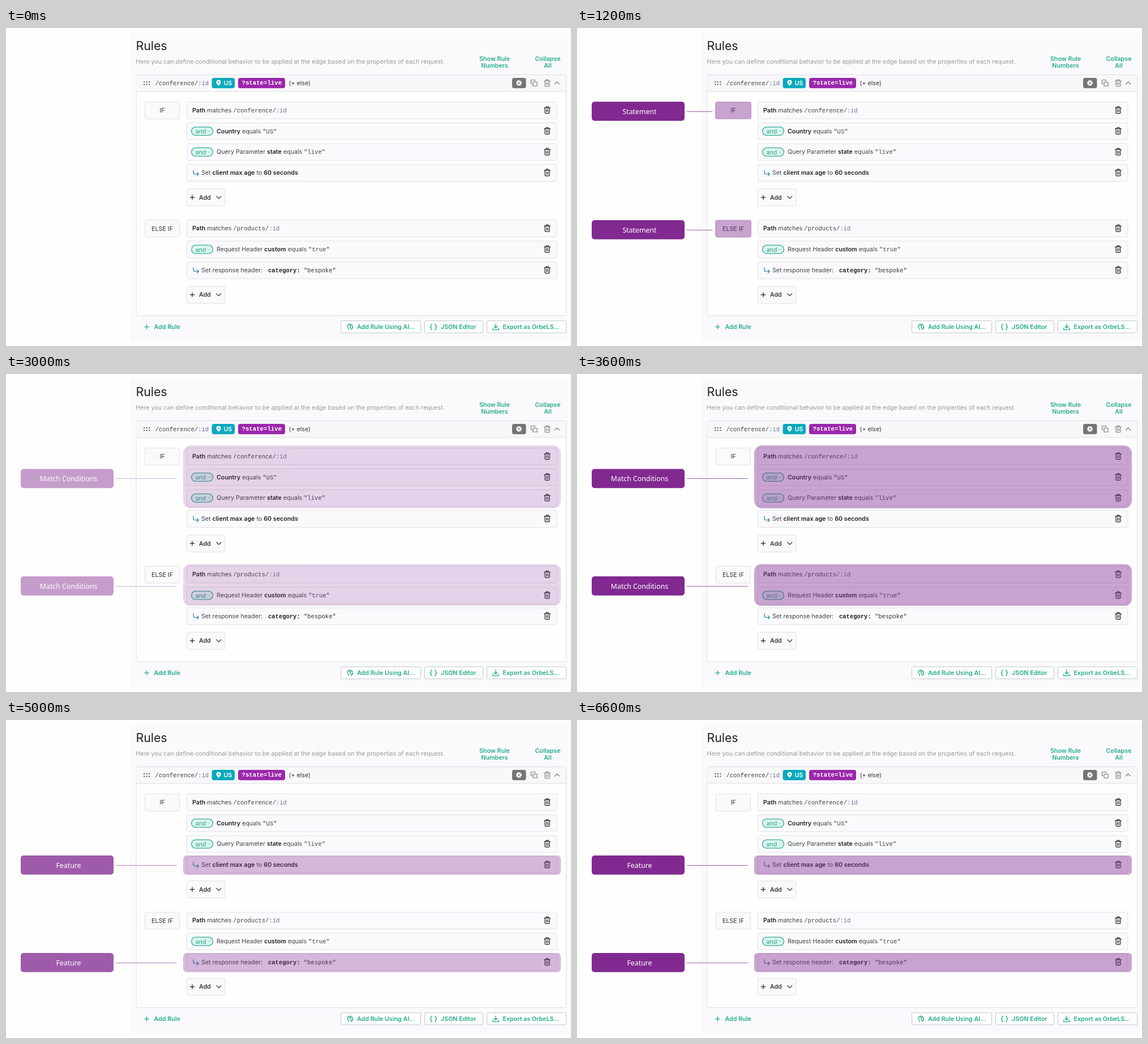
An HTML page for the animation above (6800 ms loop, 998 by 561 pixels).

```html
<!DOCTYPE html>
<html lang="en">
<head>
<meta charset="utf-8">
<title>Rules</title>
<style>
  html, body { margin: 0; width: 100%; height: 100%; overflow: hidden; background: #fefefd; }
  svg { display: block; width: 100%; height: 100%; }
  text { font: 10.7px Inter, sans-serif; fill: #444; white-space: pre; }
  .bold { font-weight: 600; fill: #222; }
  .mono { font-family: "Liberation Mono", monospace; font-size: 10.5px; }
  .id { fill: #63709c; }
  .link { font-weight: 600; fill: #25ab8e; }
  .label { font: 12.3px "Noto Sans", sans-serif; fill: #fff; }
  .mid { text-anchor: middle; }
  path { fill: none; stroke: #222; stroke-width: 1.2; stroke-linecap: round; stroke-linejoin: round; }
  .green { stroke: #25ab8e; stroke-width: 1.3; }
  .grey { stroke: #777; stroke-width: 1.1; }
</style>
</head>
<body>
<svg id="stage" viewBox="0 0 998 561"></svg>
<script>
const PURPLE = '#812990', BORDER = '#e0e1e6';

const box = (x, y, w, h, fill, r = 3, extra = '') =>
  `<rect x="${x}" y="${y}" width="${w}" height="${h}" rx="${r}" fill="${fill}" ${extra}/>`;
const framed = (x, y, w, h, fill = '#fafafd', r = 2.5, stroke = BORDER) =>
  box(x + .5, y + .5, w - 1, h - 1, fill, r, `stroke="${stroke}"`);
const text = (x, y, str, cls = '', style = '') =>
  `<text x="${x}" y="${y}" class="${cls}" style="${style}">${str}</text>`;
const path = (x, y, d, cls = '') => `<path transform="translate(${x} ${y})" d="${d}" class="${cls}"/>`;

// *bold*, `monospace`, and a tinted :id parameter
const rich = str => str
  .replace(/\*(.+?)\*/g, '<tspan class="bold">$1</tspan>')
  .replace(/`(.+?)`/g, '<tspan class="mono">$1</tspan>')
  .replace(':id', '<tspan class="id">:id</tspan>');

const plus = (x, y, cls) => path(x, y, 'M-3.8 0H3.8M0-3.8V3.8', cls);
const chevron = (x, y, dir = 1, cls = '') => path(x, y, `M-4 ${-2 * dir}L0 ${2 * dir}L4 ${-2 * dir}`, cls);
const trash = (x, y, cls) => path(x, y,
  'M-5.3-3.8H5.3M-2-3.8V-5.8H2V-3.8M-4-3.8V4.6Q-4 6-2.6 6H2.6Q4 6 4 4.6V-3.8M-1.3-1V3.3M1.3-1V3.3', cls);

function row(y, kind, str) {
  let out = framed(319, y, 654.5, 30.7) + trash(956, y + 14.6);
  let x = 329;
  if (kind === 'and') {
    x = 372;
    out += box(327.6, y + 7.9, 37.8, 14.8, '#dcf5ef', 7.4, 'stroke="#36ad95" stroke-width="1.3"')
      + text(334.5, y + 19.3, 'and', '', 'fill:#2ba58c')
      + `<path d="M356.5 ${y + 14.6}l2 2 2-2" style="stroke:#8fcfc0;stroke-width:1"/>`;
  } else if (kind === 'set') {
    x = 345;
    out += `<path d="M331 ${y + 10.5}v4q0 3 3 3h6.2m-2.8-2.8l2.8 2.8-2.8 2.8" style="stroke:#2a7f9d"/>`;
  }
  return out + text(x, y + 18.8, rich(str));
}

function statement(y, name, rows) {
  const addY = y + rows.length * 36.75 + 6.4;
  return framed(245, y, 62, 31) + text(276, y + 19.4, name, 'mid', 'fill:#333')
    + rows.map(([kind, str], i) => row(y + i * 36.75, kind, str)).join('')
    + framed(319, addY, 68.5, 31) + plus(329, addY + 15.4)
    + text(341, addY + 19.2, 'Add', '', 'font-weight:500;fill:#222') + chevron(375.8, addY + 15.4);
}

function ruleHeader() {
  let dots = '';
  for (let i = 0; i < 6; i++)
    dots += `<circle cx="${244.2 + i % 3 * 4.5}" cy="${i < 3 ? 95 : 99.4}" r="1.2" fill="#666"/>`;
  return box(230, 83, 759, 29, '#f8f8fa') + box(230, 111.5, 759, 1, BORDER, 0) + dots
    + text(263.5, 100.8, rich('`/conference/:id`'))
    + box(363.5, 88, 40.5, 18.3, '#0ba9bc', 4)
    + '<path d="M375.5 102Q371.5 98 371.5 95.7A4 4 0 0 1 379.5 95.7Q379.5 98 375.5 102Z" style="fill:#fff;stroke:none"/>'
    + '<circle cx="375.5" cy="95.8" r="1.4" fill="#0ba9bc"/>'
    + text(384.5, 100.8, 'US', 'bold', 'fill:#fff')
    + box(410, 88, 83, 18.3, '#9a27ab', 4)
    + text(416.5, 100.3, '?state=live', 'mono bold', 'fill:#fff;font-size:10.7px')
    + text(499.5, 100.8, '(+ else)', '', 'fill:#333')
    + box(894, 88, 24.5, 18.3, '#757575', 3.5)
    + '<circle cx="906" cy="97" r="2.7" fill="none" stroke="#fff" stroke-width="2.2"/>'
    + '<circle cx="906" cy="97" r="4.2" fill="none" stroke="#fff" stroke-width="1.7" stroke-dasharray="2 1.3"/>'
    + path(932.5, 97, 'M-1.5-1.5H5.5V5.2H-1.5ZM-3.2 1.5H-5V-5.2H2V-3.3', 'grey')
    + trash(956, 97, 'grey') + chevron(973.5, 97, -1, 'grey');
}

function footer() {
  const button = (x, w, tx, label) => framed(x, 516, w, 22.3, '#fefefd', 2, '#c3c9cf') + text(tx, 531, label, 'link');
  return plus(248.5, 527.3, 'green') + text(261.5, 531, 'Add Rule', 'link')
    + button(591, 142, 620, 'Add Rule Using AI...')
    + button(739, 104, 768, 'JSON Editor')
    + button(849, 141, 877.5, 'Export as OrbeLS...')
    + path(607.5, 527, 'M-2.5 5V2.5Q-5 .5-4.6-1.5A4.8 4.8 0 0 1 4.6-.8L5.3 1.5H4.2V3.5H1.8V5M-1.5-1.5A1.7 1.7 0 1 1 .3.5V2', 'green')
    + path(755, 527.3, 'M-2.5-5Q-4.3-5-4.3-3V-1.3Q-4.3 0-5.8 0Q-4.3 0-4.3 1.3V3Q-4.3 5-2.5 5M2.5-5Q4.3-5 4.3-3V-1.3Q4.3 0 5.8 0Q4.3 0 4.3 1.3V3Q4.3 5 2.5 5', 'green')
    + path(865, 527.3, 'M0-5.5V2M-3-1L0 2L3-1M-5.3 2V5H5.3V2', 'green');
}

const page = box(219, 9, 779, 543.5, '#fafafd', 0)
  + text(229.5, 38.6, 'Rules', '', 'font-size:21.3px;fill:#222')
  + text(229.3, 62.5, 'Here you can define conditional behavior to be applied at the edge based on the properties of each request.', '', 'fill:#999')
  + text(863, 58, 'Show Rule', 'link mid') + text(863, 70, 'Numbers', 'link mid')
  + text(957, 58, 'Collapse', 'link mid') + text(957, 70, 'All', 'link mid')
  + framed(229.5, 82, 760.5, 426, '#fefefd', 3)
  + ruleHeader()
  + statement(130, 'IF', [
      ['', '*Path* matches `/conference/:id`'],
      ['and', '*Country* equals `"US"`'],
      ['and', 'Query Parameter *state* equals `"live"`'],
      ['set', 'Set *client max age* to *60 seconds*']])
  + statement(338.5, 'ELSE IF', [
      ['', '*Path* matches `/products/:id`'],
      ['and', 'Request Header *custom* equals `"true"`'],
      ['set', 'Set response header:']])
  + text(463, 430.8, '<tspan class="bold">category:</tspan> "bespoke"', 'mono', 'fill:#333')
  + footer();

// Each callout: label, fade-in start, end, then [button y, highlight x, y, w, h, radius] twice
const callouts = [
  ['Statement', 620, 2600, [130, 244, 130, 64, 30.7, 4], [339, 244, 338.7, 64, 30.7, 4]],
  ['Match Conditions', 2775, 4600, [167.5, 313, 126, 667, 111, 14], [357, 313, 335.5, 667, 73.5, 12]],
  ['Feature', 4620, 6800, [239, 313, 239, 667, 34, 6], [411, 313, 411, 667, 33.7, 6]]
];
const LOOP = 6800, STEP = 200, FADE = 500;

const pointer = label => ([y, hx, hy, w, h, r]) =>
  box(hx, hy, w, h, PURPLE, r, 'fill-opacity=".42"')
  + box(194, Math.floor(y + 17), (hx < 300 ? 239.5 : 301.5) - 194, 1, PURPLE, 0, 'fill-opacity=".75"')
  + box(26, y, 164, 33.7, PURPLE, 5)
  + text(110.5, y + 21.6, label, 'label mid');

const stage = document.getElementById('stage');
stage.innerHTML = page + callouts.map(([label, , , ...spots]) =>
  `<g class="callout" opacity="0">${spots.map(pointer(label)).join('')}</g>`).join('');
const groups = stage.querySelectorAll('.callout');

function draw(now) {
  const t = Math.floor(now % LOOP / STEP) * STEP;
  callouts.forEach(([, start, end], i) => {
    const alpha = t < end ? Math.min(1, Math.max(0, (t - start) / FADE)) : 0;
    groups[i].setAttribute('opacity', alpha);
  });
  requestAnimationFrame(draw);
}
draw(performance.now());
</script>
</body>
</html>
```
